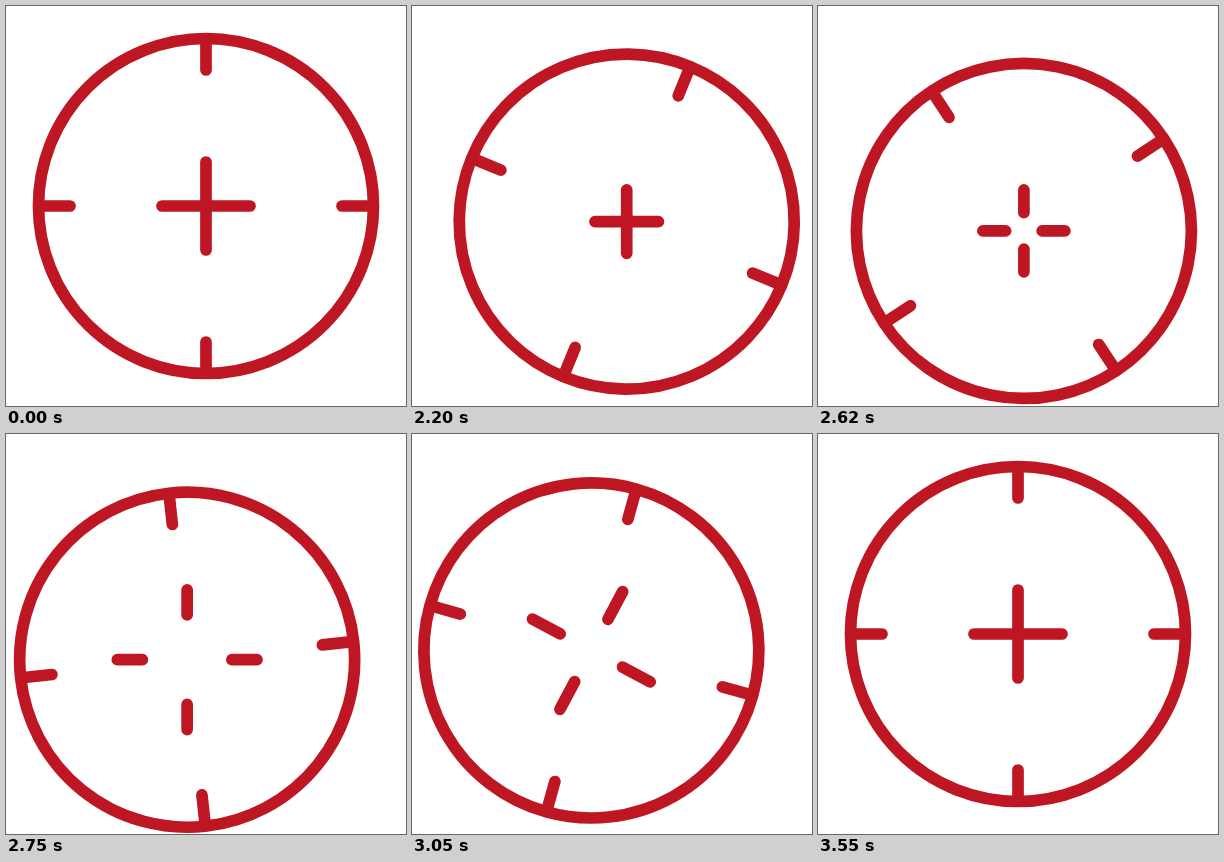
Animation of 400x400 px, one loop 3.57 s. Source, as an HTML page:

```html
<!DOCTYPE html>
<html lang="en">
<head>
<meta charset="utf-8">
<title>Crosshair</title>
<style>
  html, body { margin: 0; width: 100%; height: 100%; overflow: hidden; background: #fff; }
  svg { display: block; width: 100%; height: 100%; }
  g { fill: none; stroke: #be1622; stroke-width: 11.7; stroke-linecap: round; }
</style>
</head>
<body>
<svg viewBox="0 0 400 400">
  <g id="sight">
    <g id="ring">
      <circle r="167.5"/>
      <path d="M0-166V-136M0 166V136M-166 0H-136M166 0H136"/>
    </g>
    <path id="cross"/>
  </g>
</svg>
<script>
const LOOP = 3570, STEP = 25;
const [sight, ring, cross] = ['sight', 'ring', 'cross'].map(id => document.getElementById(id));

const progress = (t, from, to) => Math.min(1, Math.max(0, (t - from) / (to - from)));
const easeOut = (u, power) => 1 - (1 - u) ** power;
const easeInOut = (t, from, to) => {
  const u = progress(t, from, to);
  return u * u * (3 - 2 * u);
};

function draw(now) {
  const t = Math.floor((now % LOOP + 5) / STEP) * STEP;
  const leave = progress(t, 2000, 2500);
  const drift = easeOut(leave, 2);
  const shrink = easeOut(leave, 1.5);
  const swing = easeInOut(t, 2490, 2825);
  const rejoin = easeInOut(t, 2905, 3295);

  // Down right, across to the left, then back to the middle.
  const x = 200 + 23 * drift - 48 * swing + 25 * easeInOut(t, 2985, 3230);
  const y = 200 + 24.4 * drift + 1.5 * swing - 25.9 * easeInOut(t, 2912, 3250);
  // A quarter turn that overshoots and settles.
  const turn = 41.6 * shrink + 65 * easeInOut(t, 2490, 2923) - 16.6 * easeInOut(t, 2965, 3520);
  const gap = 51.3 * swing * (1 - rejoin);
  const tip = gap + 44 - 22.9 * shrink + 4.6 * swing + 18.3 * rejoin;

  sight.setAttribute('transform', `translate(${x} ${y})`);
  ring.setAttribute('transform', `rotate(${turn})`);
  cross.setAttribute('transform', `rotate(${90 * rejoin})`);
  cross.setAttribute('d', `M0 ${-gap}V${-tip}M0 ${gap}V${tip}M${-gap} 0H${-tip}M${gap} 0H${tip}`);
}

const start = performance.now();
function tick() {
  draw(performance.now() - start);
  requestAnimationFrame(tick);
}
tick();
</script>
</body>
</html>
```
